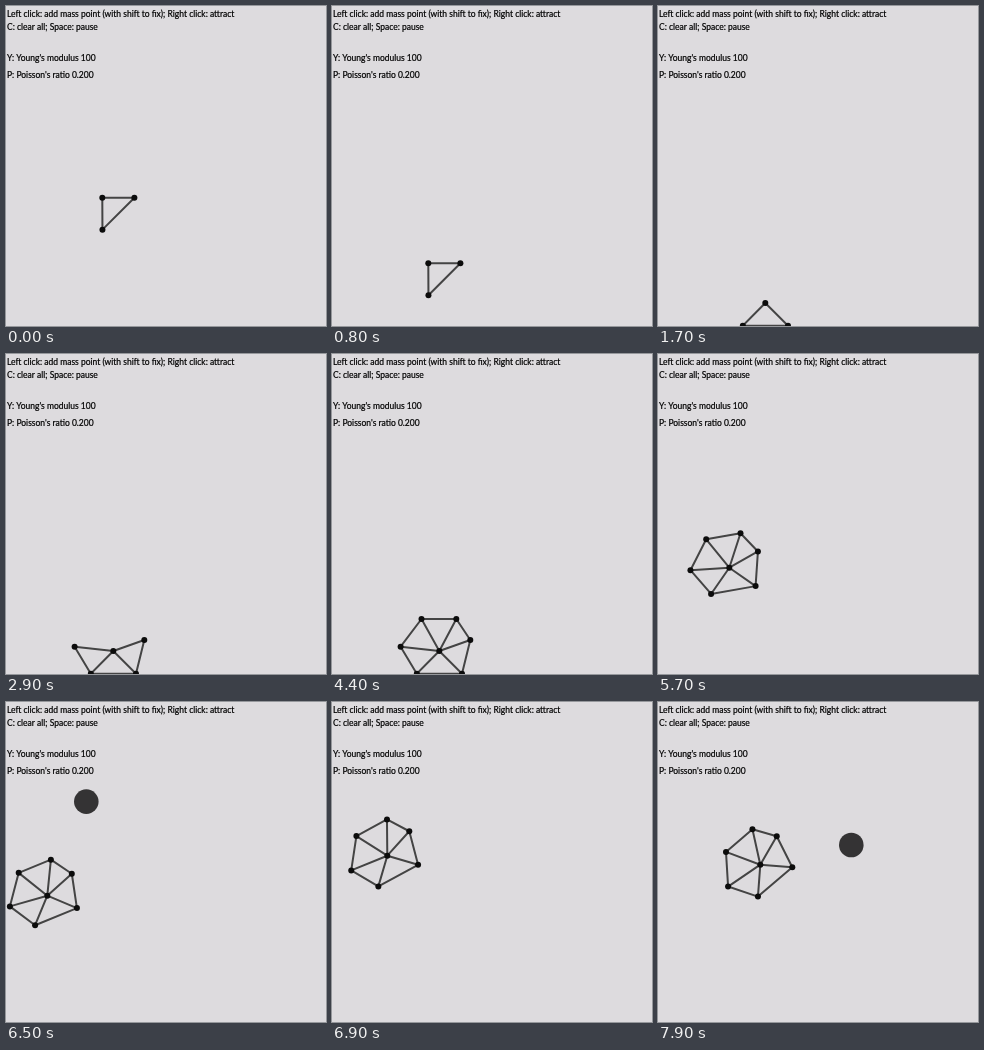
These frames come from a looping animation (320x320 px, 8 s). An HTML page with a canvas:

```html
<!DOCTYPE html>
<html lang="en">
<head>
<meta charset="utf-8">
<title>Elastic points</title>
<style>
  html, body { margin: 0; width: 100%; height: 100%; overflow: hidden; background: #dddbde; }
  canvas { display: block; width: 320px; height: 320px; }
</style>
</head>
<body>
<canvas id="stage" width="320" height="320"></canvas>
<script>
const ctx = document.getElementById('stage').getContext('2d');
const SIZE = 320, LOOP = 8000, STEP = 100;
const FALL = 1.025; // half the gravity, px per step squared
const LIFT = 5000;  // first pull by the attractor

// Body at rest, relative to its hub, with the time each point is added
const points = {
  hub:   { x: 0,     y: 0,    at: 0 },
  footL: { x: -22.5, y: 22.7, at: 0 },
  footR: { x: 22.7,  y: 22.7, at: 0 },
  right: { x: 31,    y: -11,  at: 2200 },
  left:  { x: -38.7, y: -4.3, at: 2700 },
  topL:  { x: -17.8, y: -32,  at: 3600 },
  topR:  { x: 17,    y: -32,  at: 3900 }
};
const edges = [
  'hub footL', 'hub footR', 'footL footR', 'right hub', 'right footR',
  'left hub', 'left footL', 'topL left', 'topL hub',
  'topR topL', 'topR hub', 'topR right'
].map(pair => pair.split(' '));

// Key poses in flight; velocities in px per step make the arcs
const flight = [
  { t: LIFT, x: 107, y: 296, vx: -5,  vy: -19, turn: 0 },
  { t: 5700, x: 71,  y: 214, vx: -5,  vy: -5,  turn: 10 },
  { t: 6500, x: 41,  y: 194, vx: 1.5, vy: -8,  turn: 22.3 },
  { t: 6900, x: 55,  y: 154, vx: 4.1, vy: -9,  turn: 28.5 },
  { t: 7900, x: 102, y: 163, vx: 6.2, vy: 9.5, turn: 40.5 }
];
// Attractor: place at its start and drift per step
const pulls = [
  { start: 5000, end: 5300, x: 62,  y: 154.5, dx: 0,  dy: 0 },
  { start: 6200, end: 6700, x: 92,  y: 105,   dx: -4, dy: -1.7 },
  { start: 7700, end: 8000, x: 193, y: 143.3, dx: 0,  dy: 0 }
];

const mix = (a, b, k) => a + (b - a) * k;
const rad = deg => deg * Math.PI / 180;

function smooth(from, to, t) {
  const k = Math.min(1, Math.max(0, (t - from) / (to - from)));
  return k * k * (3 - 2 * k);
}

function hermite(a, va, b, vb, steps, k) {
  const ease = k * k * (3 - 2 * k);
  return mix(a, b, ease) + steps * k * (1 - k) * (va * (1 - k) - vb * k);
}

function fall(t) {
  return { x: 96, y: 192 + FALL * (t / STEP) ** 2, turn: 45 };
}

// The left foot stays on the floor, the centre of mass keeps its x
function tumble(t) {
  const turn = 45 * (1 - smooth(900, 1350, t)), r = rad(turn);
  const { x, y } = points.footL;
  return {
    x: 107 - 15.2 * Math.sin(r),
    y: SIZE + x * Math.sin(r) - y * Math.cos(r),
    turn
  };
}

function fly(t) {
  const i = flight.findIndex(key => t <= key.t);
  const a = flight[Math.max(0, i - 1)], b = flight[Math.max(1, i)];
  const k = (t - a.t) / (b.t - a.t), steps = (b.t - a.t) / STEP;
  return {
    x: hermite(a.x, a.vx, b.x, b.vx, steps, k),
    y: hermite(a.y, a.vy, b.y, b.vy, steps, k),
    turn: mix(a.turn, b.turn, k)
  };
}

function pose(t) {
  if (t <= 900) return fall(t);
  return t < LIFT ? tumble(t) : fly(t);
}

function dot(x, y, r, color) {
  ctx.fillStyle = color;
  ctx.beginPath();
  ctx.arc(x, y, r, 0, Math.PI * 2);
  ctx.fill();
}

function label(text, y) {
  ctx.fillText(text, 1, y);
  ctx.strokeText(text, 1, y);
}

function drawText() {
  ctx.fillStyle = ctx.strokeStyle = '#000';
  ctx.lineWidth = 0.2;
  ctx.font = '8.5px Lato, sans-serif';
  label('Left click: add mass point (with shift to fix); Right click: attract', 11.3);
  label('C: clear all; Space: pause', 23.5);
  label("Y: Young's modulus 100", 55.3);
  label("P: Poisson's ratio 0.200", 71.5);
}

function drawBody(t) {
  const { x, y, turn } = pose(t);
  const c = Math.cos(rad(turn)), s = Math.sin(rad(turn));
  const placed = {};
  for (const [name, p] of Object.entries(points)) {
    if (t >= p.at) placed[name] = [x + p.x * c + p.y * s, y - p.x * s + p.y * c];
  }
  ctx.strokeStyle = '#444';
  ctx.lineWidth = 2;
  ctx.beginPath();
  for (const [a, b] of edges) {
    if (!placed[a] || !placed[b]) continue;
    ctx.moveTo(...placed[a]);
    ctx.lineTo(...placed[b]);
  }
  ctx.stroke();
  for (const p of Object.values(placed)) dot(...p, 3, '#0c0c0c');
}

function drawAttractor(t) {
  for (const { start, end, x, y, dx, dy } of pulls) {
    if (t < start || t >= end) continue;
    const n = (t - start) / STEP;
    dot(x + dx * n, y + dy * n, 12.3, '#343334');
  }
}

function frame() {
  const t = Math.floor((performance.now() % LOOP) / STEP) * STEP;
  ctx.fillStyle = '#dddbde';
  ctx.fillRect(0, 0, SIZE, SIZE);
  ctx.save();
  ctx.translate(0.3, -0.3); // the scene sits half a fine pixel off the grid
  drawBody(t);
  drawAttractor(t);
  ctx.restore();
  drawText();
  requestAnimationFrame(frame);
}
frame();
</script>
</body>
</html>
```
